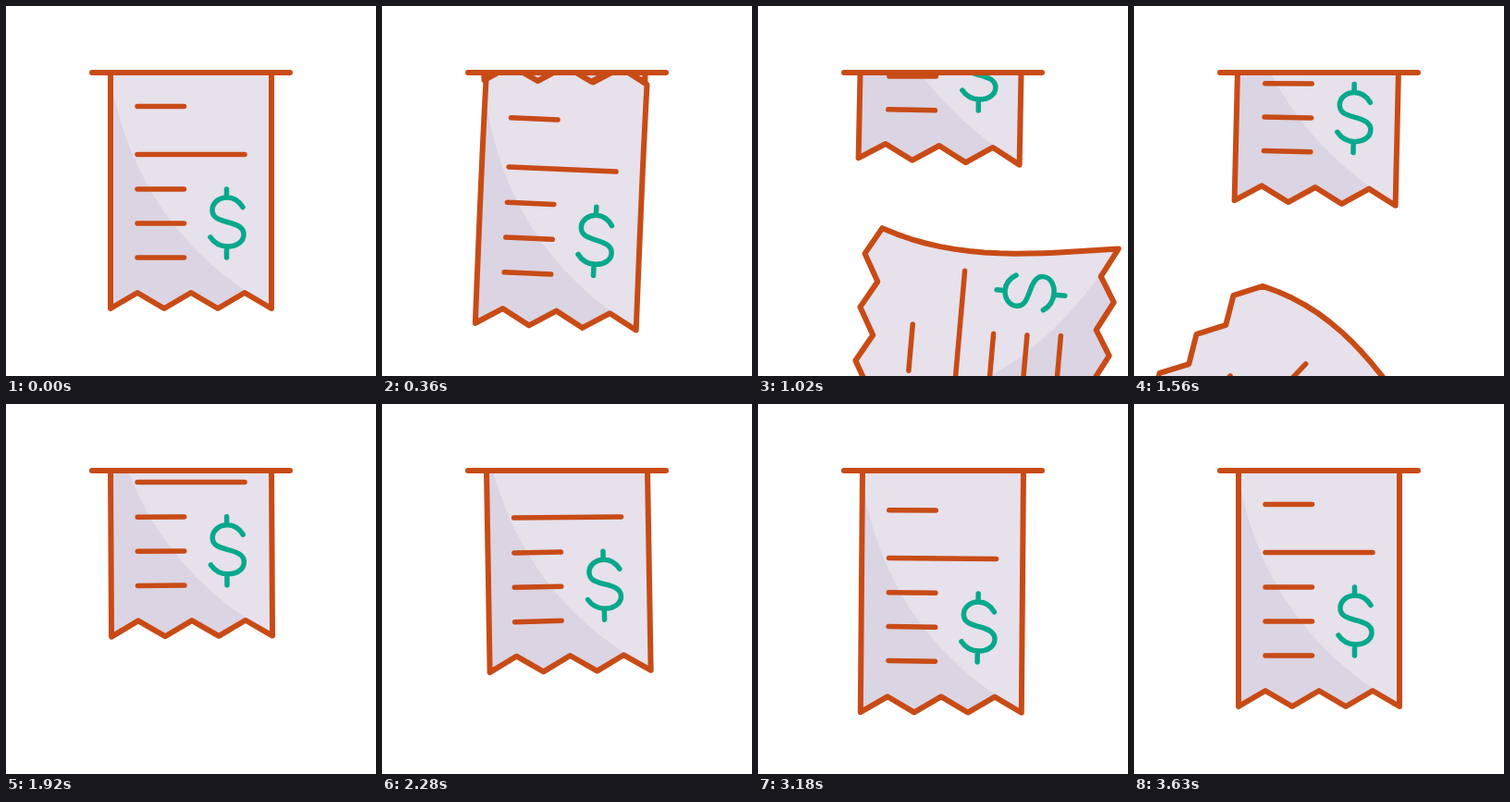
Write an HTML page that moves like this. It is 400x400 px and loops after 6140 ms.

```html
<!DOCTYPE html>
<html lang="en">
<head>
<meta charset="utf-8">
<title>Receipt</title>
<style>
  html, body { margin: 0; width: 100%; height: 100%; overflow: hidden; background: #fff; }
  svg { display: block; width: 100%; height: 100%; }
  path, line { fill: none; stroke: #c84b16; stroke-width: 6; stroke-linecap: round; stroke-linejoin: round; }
  .body { fill: #e6e1eb; stroke: none; }
  .shade { fill: #dbd4e2; stroke: none; }
  .rows { stroke-width: 5.5; }
  .dollar { stroke: #07a88b; stroke-width: 5.5; }
</style>
</head>
<body>
<svg viewBox="0 0 400 400">
  <defs><clipPath id="slot"><rect y="72" width="400" height="328"/></clipPath></defs>
  <g clip-path="url(#slot)"><g id="torn"></g><g id="next"></g></g>
  <line x1="93" y1="72" x2="307" y2="72"/>
</svg>
<script>
const LOOP = 6140, STEP = 30, END = 3630, TEAR = 630, GONE = 1920;
const TOP = 61, BOTTOM = 327, HEIGHT = BOTTOM - TOP, LEFT = 113, RIGHT = 287, MID = 200, SLOT = 72;
const DOLLAR = 'M256 217.5C252 211 246 207 239 207C230 207 223 213 223 220.5C223 229 230 231 239 233.5' +
  'C249 236 257 239 257 247C257 255 249 260 240 260C231 260 225 256 221 250M238.5 198V206M238.5 262V272';

// Key poses of the torn receipt: time, centre, turn in degrees, sideways bow
const FALL = [
  { t: 0, x: 200, y: 194, turn: 0, bow: 0 },
  { t: 250, x: 186, y: 201, turn: 6.5, bow: 2 },
  { t: TEAR, x: 223.5, y: 257, turn: -18.3, bow: -9 },
  { t: 1020, x: 254.5, y: 338, turn: -85, bow: -16 },
  { t: 1560, x: 171, y: 453, turn: -46.5, bow: 22 },
  { t: GONE, x: 140, y: 605, turn: -4, bow: 8 }
];

// How far the new receipt has come out, relative to its resting place
const FEED = [[0, -HEIGHT], [TEAR, -217], [1020, -159], [1560, -114], [2280, -38], [2880, 12], [3400, 0]]
  .map(([t, y]) => ({ t, y }));

// Smooth curve through one property of the keys
function sample(keys, t, prop) {
  const last = keys.length - 1;
  if (t >= keys[last].t) return keys[last][prop];
  const i = keys.findIndex(k => k.t > t) - 1, a = keys[i], b = keys[i + 1];
  const slope = n => n === 0 || n === last ? 0 :
    (keys[n + 1][prop] - keys[n - 1][prop]) / (keys[n + 1].t - keys[n - 1].t);
  const span = b.t - a.t, u = (t - a.t) / span, v = 1 - u;
  return v * v * (1 + 2 * u) * a[prop] + u * u * (3 - 2 * u) * b[prop] +
    span * u * v * (v * slope(i) - u * slope(i + 1));
}

// Flutter of the new receipt: slow until it is out of the slot, then steady, fading at the end
function flutter(t) {
  const cycles = Math.max((t - TEAR) / 800, (t - 770) / 520);
  return 4.4 * Math.min(1, (END - t) / 600) * Math.cos(2 * Math.PI * cycles);
}

const rad = deg => deg * Math.PI / 180;
const clamp = n => Math.min(1, Math.max(0, n));
const range = (n, f) => Array.from({ length: n + 1 }, (_, i) => f(i / n, i));
const side = (x, from, to) => range(16, u => [x, from + (to - from) * u]);
const teeth = y => range(6, (u, i) => [LEFT + (RIGHT - LEFT) * u, y - (i % 2 ? 17 : 0)]);
const pathOf = points => 'M' + points.map(p => p.map(n => n.toFixed(2)).join(' ')).join('L');

const quad = (a, b, c, u) => (1 - u) ** 2 * a + 2 * u * (1 - u) * b + u * u * c;
const arc = range(20, u => [quad(LEFT, 141, 262, u), quad(80, 230, 310, u)]);
const shade = [...arc, ...teeth(BOTTOM).slice(0, 5).reverse(), ...side(LEFT, BOTTOM, 80)];
const rows = [108.5, 160.5, 198, 235, 272].map((y, i) => [[142, y], [i === 1 ? 258 : 192.5, y]]);

function makePaper(id) {
  const group = document.getElementById(id), parts = { group };
  for (const name of ['body', 'shade', 'rows', 'dollar', 'edge']) {
    const el = document.createElementNS('http://www.w3.org/2000/svg', 'path');
    el.setAttribute('class', name);
    parts[name] = group.appendChild(el);
  }
  parts.dollar.setAttribute('d', DOLLAR);
  return parts;
}

// map bends the sheet, mapPrint carries the rows and the dollar sign
function drawPaper(paper, top, map, mapPrint) {
  const place = points => pathOf(points.map(p => map(...p)));
  const outline = place([
    ...teeth(top), ...side(RIGHT, top, BOTTOM), ...teeth(BOTTOM).reverse(), ...side(LEFT, BOTTOM, top)
  ]) + 'Z';
  paper.body.setAttribute('d', outline);
  paper.edge.setAttribute('d', outline);
  paper.shade.setAttribute('d', place(shade) + 'Z');
  paper.rows.setAttribute('d', rows.map(row => pathOf(row.map(p => mapPrint(...p)))).join(''));

  const cx = 239, cy = 235, [x, y] = mapPrint(cx, cy), [rx, ry] = mapPrint(cx + 10, cy);
  const angle = Math.atan2(ry - y, rx - x) * 180 / Math.PI;
  paper.dollar.setAttribute('transform', `translate(${x} ${y}) rotate(${angle}) translate(${-cx} ${-cy})`);
}

const torn = makePaper('torn'), next = makePaper('next');

function drawTorn(t) {
  const [x, y, turn, bow] = ['x', 'y', 'turn', 'bow'].map(prop => sample(FALL, t, prop));
  const cos = Math.cos(rad(turn)), sin = Math.sin(rad(turn));
  const length = HEIGHT - 0.6 * Math.abs(bow);
  const bend = amount => (px, py) => {
    const f = (py - TOP) / HEIGHT;
    const across = px - MID + 4 * amount * Math.max(0, f * (1 - f)) * (1.4 - 0.8 * f);
    const down = (f - 0.5) * length;
    return [x + across * cos - down * sin, y + across * sin + down * cos];
  };
  // The print bows less and slips up the sheet, most at the moment of tearing
  const lift = clamp(t / TEAR) * (5 + 20 * clamp(1 - Math.abs(t - TEAR) / 390));
  const bendPrint = bend(0.55 * Math.min(0, bow));
  drawPaper(torn, TOP, bend(bow), (px, py) => bendPrint(px, py - lift * (BOTTOM - py) / HEIGHT));
}

function drawNext(t) {
  const feed = sample(FEED, t, 'y'), sway = flutter(t);
  const depth = Math.max(20, BOTTOM + feed - SLOT);
  const rootShift = sway * Math.max(0, (-feed - 80) / 140);
  const endTilt = -rad(sway * Math.max(0.05, 0.1 - 0.0028 * feed));
  const fraction = y => clamp((y + feed - SLOT) / depth);
  const map = (x, y) => {
    const f = fraction(y);
    return [x + rootShift + (sway - rootShift) * f, y + feed + (x - MID) * endTilt * f];
  };
  const mapPrint = (x, y) => {
    const swing = 0.6 * sway * fraction(y);
    return [x + swing, y + feed - (x - MID) * rad(swing)];
  };
  drawPaper(next, SLOT - 30 - feed, map, mapPrint);
}

function render(time) {
  const t = Math.min(END, Math.floor((time % LOOP) / STEP) * STEP);
  torn.group.style.display = t < GONE ? '' : 'none';
  if (t < GONE) drawTorn(t);
  drawNext(t);
}

const start = performance.now();
function tick() {
  render(performance.now() - start);
  requestAnimationFrame(tick);
}
tick();
</script>
</body>
</html>
```
